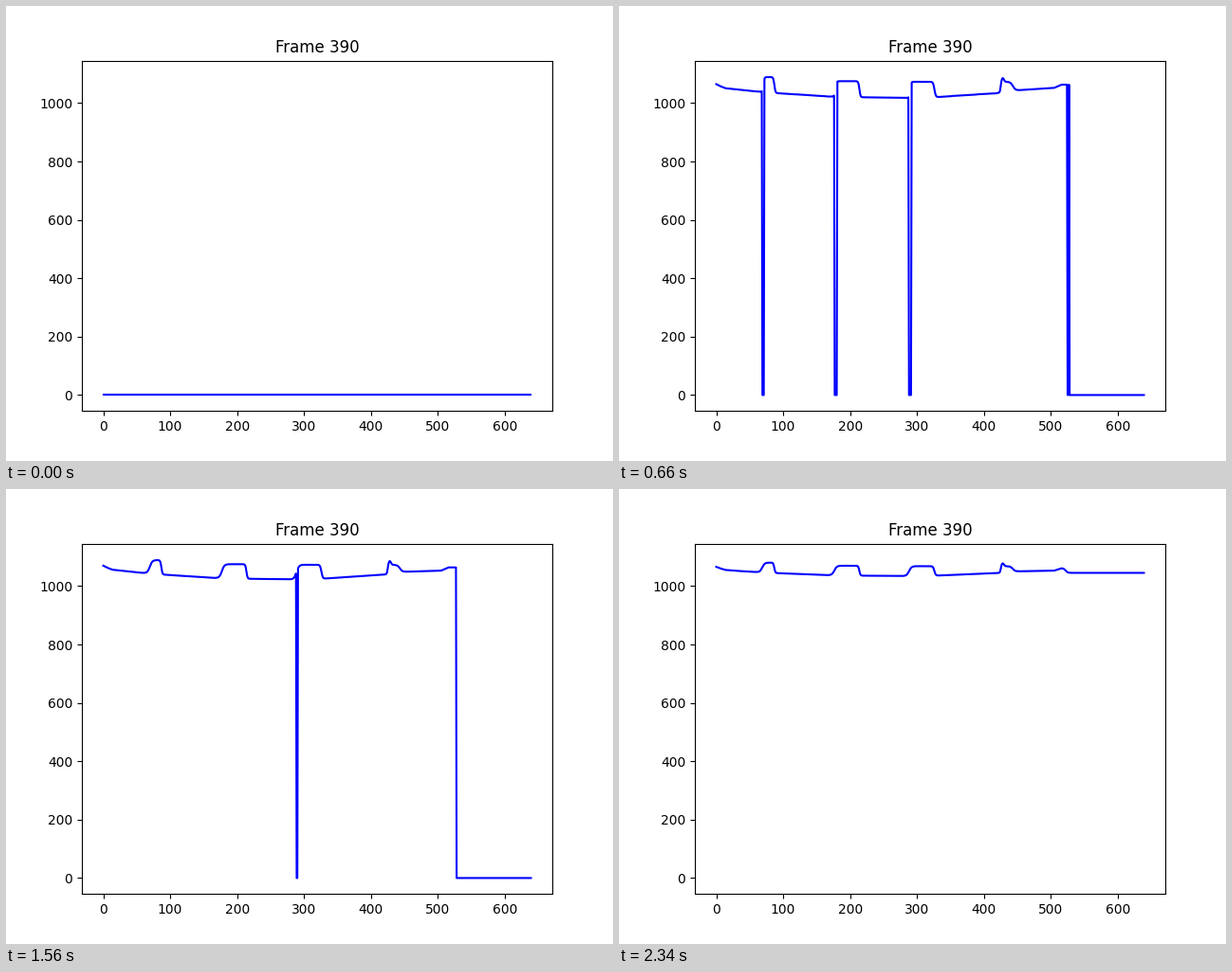
A matplotlib script for the animation above (2.4 s loop, 640 by 480 pixels).

```python
import numpy as np
import matplotlib.pyplot as plt
from matplotlib.animation import FuncAnimation

FRAMES = 40
INTERVAL = 60
N = 640
PEAK = 1091
FILL = 30  # step at which the empty right end gets a value
x = np.arange(N)

# Key points of the low ground between the plateaus.
FLOOR = [(0, 1070), (6, 1063), (14, 1056), (50, 1047), (92, 1039),
         (165, 1028), (219, 1025), (285, 1023), (332, 1026), (418, 1039),
         (450, 1049), (505, 1053), (516, 1064), (527, 1064)]

# Plateaus: rise, softening of the rise, fall, fall width, height.
PLATEAUS = [(70.5, 1, 86.8, 0.8, 1089),
            (178.2, 1, 213.9, 0.8, 1075),
            (289.8, 1, 326, 1, 1073),
            (425, 0, 443.5, 2, 1073)]

# Closing gaps: centre, reach, step at which they are gone.
GAPS = [(70.05, 2.2, 15), (178.28, 2.4, 23), (289.5, 3, FILL), (525.5, 0.4, 15)]


def sigmoid(t):
    return 1 / (1 + np.exp(-np.clip(t, -60, 60)))


def ramp(i, start, stop):
    return np.clip((i - start) / (stop - start), 0, 1)


def terrain(settle, relax):
    y = np.interp(x, *zip(*FLOOR))
    y -= (1 - settle) * np.interp(x, [450, 500], [6, 1])
    for rise, soft, fall, fall_width, top in PLATEAUS:
        centre = rise - soft * (settle + relax)
        width = 0.6 + 1.3 * soft * settle
        mask = sigmoid((x - centre) / width) * sigmoid((fall - x) / fall_width)
        y += mask * (top - y)
    return y + 13 * np.exp(-((x - 428) / 2.5) ** 2)


def ripple(i):
    rng = np.random.default_rng(i)
    knots = np.arange(0, N + 8, 8)
    wave = np.interp(x, knots, rng.uniform(-1, 1, len(knots)))
    valleys = (abs(x - 133) < 36) | (abs(x - 385) < 34)
    return 3 * np.exp(-i / 6) * wave * valleys


def curve(i):
    if i == 0:
        return np.zeros(N)
    relax = ramp(i, 26, FRAMES - 1)
    y = terrain(ramp(i, 9, 23), relax) + ripple(i)

    # Late on, heights drift towards a common level.
    level = 1053
    y -= relax * (y - level) * np.where(y < level, 0.38, 0.24)

    if i >= FILL:
        tail = 1045.3 - 0.6 * (FRAMES - 1 - i)
        y += sigmoid((x - 522) / 1.6) * (tail - y)
    else:
        y[x > 527] = 0
    for centre, reach, close in GAPS:
        if i < close:
            y[abs(x - centre) <= 0.5 + reach * (1 - i / close)] = 0
    return y


fig, ax = plt.subplots(figsize=(6.4, 4.8), dpi=100)
line, = ax.plot(x, np.zeros(N), "b-")
ax.set_ylim(-0.05 * PEAK, 1.05 * PEAK)
ax.set_title("Frame 390")


def update(i):
    line.set_ydata(curve(i))
    return line,


anim = FuncAnimation(fig, update, frames=FRAMES, interval=INTERVAL, repeat=True)
plt.show()
```
